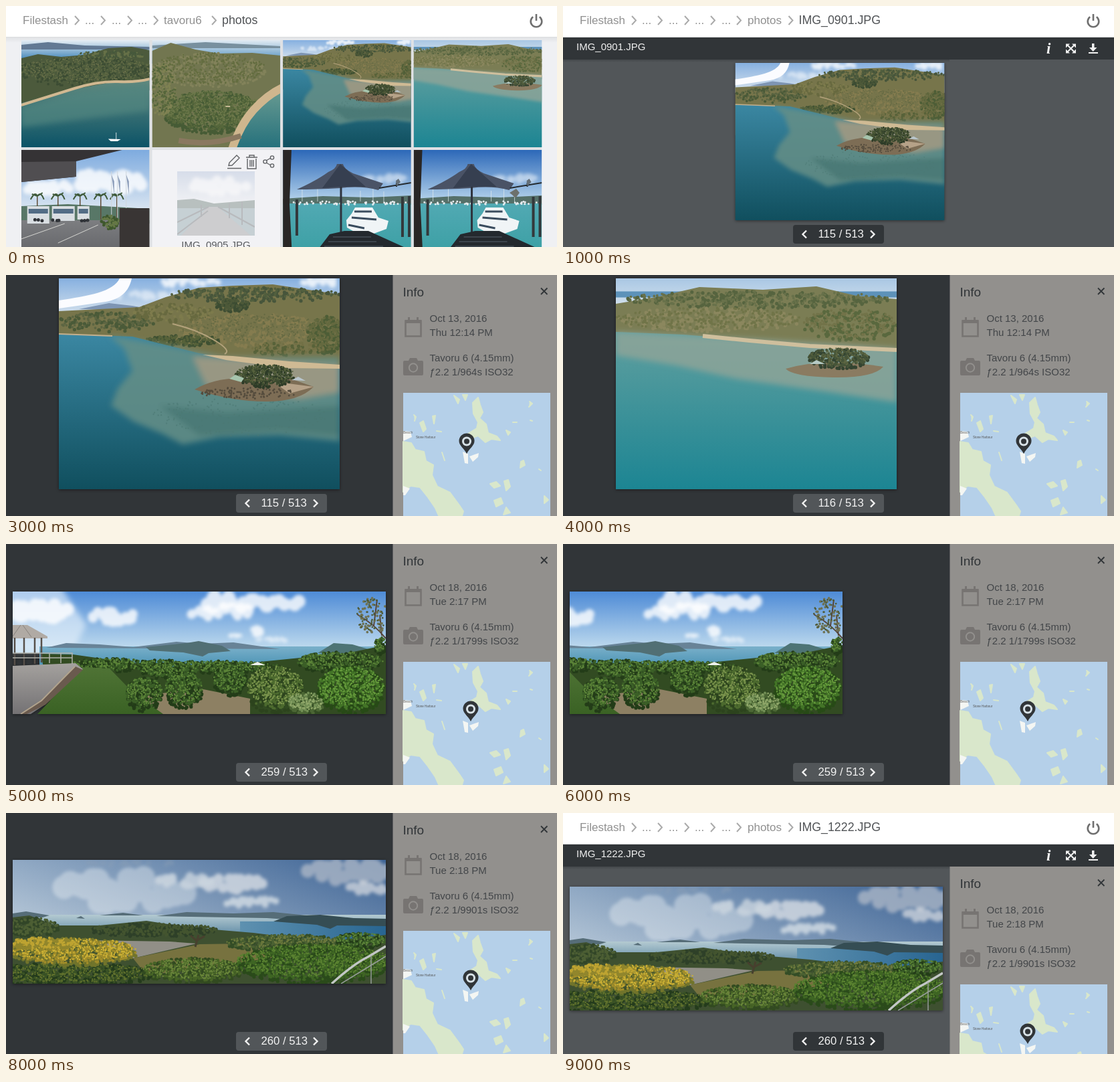
Recreate the animation shown at these times as an HTML page. Size 824 by 360 pixels, loop 10 s.

```html
<!DOCTYPE html>
<html lang="en">
<head>
<meta charset="utf-8">
<title>Photo viewer</title>
<style>
html, body { margin: 0; width: 100%; height: 100%; overflow: hidden; background: #fff; }
svg { display: block; }
text { font: 15px "Liberation Sans", Arial, sans-serif; white-space: pre; }
text.info { font: italic bold 21px "Liberation Serif", serif; }
.photo { filter: drop-shadow(0 1px 2px #0007); }
</style>
</head>
<body>
<svg id="stage" width="824" height="360" viewBox="0 0 824 360">
  <defs id="defs"></defs>
  <g id="view"></g>
</svg>
<script>
const DARK = '#313538', GREY = '#525659', PANEL = '#92908d', ICON = '#777472', TEXT = '#434649';

// ---- drawing helpers ----
let seed = 7, gradients = 0;
const random = () => (seed = seed * 16807 % 2147483647) / 2147483647;
const area = (fill, d, extra = '') => `<path fill="${fill}" d="${d}" ${extra}/>`;
const line = (stroke, width, d, extra = '') =>
  `<path fill="none" stroke="${stroke}" stroke-width="${width}" d="${d}" ${extra}/>`;
const box = (x, y, w, h) => `M${x} ${y}h${w}v${h}h${-w}z`;
const label = (x, y, text, size = 15, fill = TEXT, extra = '') =>
  `<text x="${x}" y="${y}" fill="${fill}" style="font-size:${size}px" ${extra}>${text}</text>`;
const at = (x, y, content) => `<g transform="translate(${x} ${y})">${content}</g>`;
const repeat = (list, draw) => list.map(draw).join('');

// Path filled with an even blend; slanted = 1 runs it left to right.
function wash(d, from, to, slanted = 0) {
  const id = 'wash' + gradients++;
  return `<linearGradient id="${id}" x2="${slanted}" y2="${1 - slanted}">
    <stop stop-color="${from}"/><stop offset="1" stop-color="${to}"/></linearGradient>` + area(`url(#${id})`, d);
}
// Round dots scattered over an ellipse.
function dots(color, size, count, cx, cy, rx, ry, extra = '') {
  let d = '';
  for (let i = 0; i < count; i++) {
    const angle = random() * 2 * Math.PI, r = Math.sqrt(random());
    d += `M${(cx + rx * r * Math.cos(angle)).toFixed(1)} ${(cy + ry * r * Math.sin(angle)).toFixed(1)}h0`;
  }
  return line(color, size, d, 'stroke-linecap="round" ' + extra);
}
// A dense shaded mass with ever smaller and lighter dots towards its top.
const leaves = (cx, cy, rx, ry, colors, size = 3.5, density = 1) => repeat(colors, (color, i) =>
  dots(color, size * (1.5 - i * .4), rx * ry / size / size * 2.4 * density, cx, cy - i * ry * .1, rx, ry * (1 - i * .1)));
const scrub = (cx, cy, rx, ry, colors, size = 3.5) => leaves(cx, cy, rx, ry, colors, size, .45);
const cloud = (cx, cy, rx, ry, color = '#fff', opacity = .8) =>
  dots(color, ry, 26, cx, cy, rx, ry * .6, `opacity="${opacity}" filter="url(#soft)"`);
const soft = content => `<g filter="url(#blur)">${content}</g>`;

// ---- pictures ----
const BUSH = ['#233c18', '#3b5f27', '#5c8438'];

const coveArt = wing =>
  wash(box(0, 0, 420, 60), '#86b0e0', '#dce6ee') +
  cloud(190, 6, 50, 9) + cloud(390, 6, 30, 9) + cloud(130, 25, 60, 8, '#fff', .5) +
  area('#7e95b3', 'M30 46L75 37L110 41L150 48z') + wing +
  area('#77754b', 'M0 49L60 46L120 43L160 28L210 14L260 11L320 9L360 15L420 24V145H0z') +
  scrub(290, 25, 130, 11, ['#47553b', '#525f3e']) + scrub(70, 65, 75, 15, ['#4a5a38', '#5c6542']) +
  scrub(170, 52, 60, 14, ['#67693f', '#7d7b4c']) + scrub(290, 78, 110, 25, ['#857c4f', '#74734a', '#666a43']) +
  leaves(260, 40, 25, 10, ['#3c4c32', '#4c5838']) + leaves(400, 85, 28, 28, ['#4d5d36', '#64693f']) +
  leaves(185, 93, 55, 8, ['#3f5032', '#566139']) + scrub(340, 105, 60, 10, ['#586239', '#727045']) +
  line('#b3a27b', 2, 'M170 68Q205 76 232 92T248 113') +
  wash('M0 83L110 87L170 102L210 112L250 118L340 125L420 130V315H0z', '#3b87a2', '#104f5e') +
  soft(area('#668f86', 'M75 85L170 102L250 118H420V243L330 234L240 237L185 248L155 232L112 214L78 190L88 165L110 138L98 105z', 'opacity=".85"') +
    area('#42736f', 'M150 190L250 200L420 190V235L330 228L210 235z', 'opacity=".65"') +
    area('#a79c83', 'M200 117L270 120L420 130V170L360 180L220 160z', 'opacity=".8"')) +
  area('#cfba94', 'M215 114L260 116L345 124L420 129V135L340 134L250 122z') +
  line('#c4b08e', 2, 'M0 83L80 86') +
  dots('#4c7873', 2.5, 200, 270, 205, 130, 30, 'opacity=".6"') +
  area('#7d6d55', 'M203 166Q230 150 270 149T350 151L381 162Q360 184 310 184T203 166z') +
  area('#b6a288', 'M320 154L381 162L345 172z') + dots('#554c3d', 3, 110, 285, 171, 72, 9) +
  leaves(308, 146, 44, 17, ['#2d3b27', '#3e4c30', '#56613c'], 3) +
  area('#a6c4ad', 'M255 150L264 144L277 149L273 155z') + area('#b9c6cd', 'M348 152L358 147L369 153z');

const pictures = {
  cove: [420, 315, coveArt(area('#fbfcff', 'M0 33C45 26 82 20 91 0H109C105 20 92 31 70 35L0 45z'))],
  inlet: [420, 315, coveArt('')],
  bay: [420, 315,
    wash(box(0, 0, 420, 50), '#a9c7e4', '#dbe6ee') + line('#5d92b9', 9, 'M0 24H420') +
    area('#7b7d54', 'M0 38L60 28L125 13L220 17L300 12L360 26L420 31V115H0z') +
    scrub(210, 32, 200, 13, ['#56643f', '#68714a']) + scrub(140, 62, 140, 18, ['#8b875e', '#707448']) +
    scrub(350, 70, 70, 24, ['#59683e', '#727349']) +
    wash('M0 80L100 84L200 92L290 100L420 105V315H0z', '#5f9f9f', '#1c8593') +
    soft(area('#8ca498', 'M0 80L200 90L420 104V185L320 170L180 150L90 130L0 115z', 'opacity=".85"')) +
    line('#cfbf9d', 6, 'M130 86L200 93L290 101L420 107') +
    area('#8a7b61', 'M254 135Q310 118 400 132Q385 149 325 148T254 135z') +
    leaves(333, 120, 45, 16, ['#344431', '#465539', '#5c6541']) + area('#b6cac4', 'M290 128L300 122L313 128z')],
  shore: [192, 160,
    wash(box(0, 0, 192, 30), '#e6eef5', '#3e83b8') + area('#627994', 'M0 7L40 3L95 8L192 10V14H0z') +
    area('#4c5a3c', 'M0 27L25 21L60 25L95 22L130 12L165 10L192 15V75L0 99z') +
    scrub(96, 47, 105, 22, ['#3c4c33', '#56633f', '#6a704a'], 2.5) + scrub(135, 22, 50, 6, ['#657047', '#45583b'], 2.5) +
    wash('M0 94L80 73L145 61L192 59V160H0z', '#62897e', '#0b5367') +
    soft(area('#528780', 'M0 100L90 76L192 66V105L75 120L0 130z', 'opacity=".7"')) +
    line('#d1b891', 4, 'M0 97Q45 83 80 72T145 62T192 58') +
    area('#fff', 'M130 147.5L149 148L144 151H134z') + line('#fff', .8, 'M142 148V138')],
  headland: [192, 160,
    wash(box(0, 0, 192, 35), '#e1ebf3', '#3f84b8') + area('#78909f', 'M0 8L80 3L192 9V12H0z') +
    area('#727650', 'M0 16L28 4L65 14L100 20L150 19L192 23V160H0z') +
    scrub(85, 45, 85, 26, ['#82825a', '#646d40'], 2.5) + leaves(90, 108, 75, 32, ['#465b35', '#56673b', '#6c784a'], 3) +
    scrub(15, 75, 20, 40, ['#7e8152', '#56663b'], 2.5) +
    wash('M192 72L174 83L150 110L135 137L118 160H192z', '#6a9c92', '#26717c') +
    line('#cfb68e', 12, 'M195 71Q172 82 152 104T120 162') + line('#8a7860', 8, 'M40 150Q85 159 133 143') +
    line('#c6b995', 2, 'M110 99h7')],
  carpark: [192, 160,
    wash(box(0, 0, 192, 110), '#7eabdf', '#eef2f5') + cloud(125, 48, 60, 20) + cloud(45, 58, 38, 14) +
    area('#587767', 'M0 84L70 81L192 88V110H0z') +
    area('#353335', 'M0 0H151L82 17V40L0 48z') + area('#504e51', 'M0 18L82 17V40L0 48z') +
    wash(box(0, 105, 192, 55), '#7d7e81', '#616266') +
    repeat([24, 55, 88, 119, 143], x => line('#614d38', 1.5, `M${x} 104V70`) +
      line('#3f5a3a', 2, `M${x - 10} 74Q${x - 3} 61 ${x} 69Q${x + 5} 61 ${x + 10} 74M${x - 8} 66L${x} 69L${x + 8} 64`)) +
    repeat([[9, 33, 26], [46, 34, 22], [84, 18, 20]], ([x, w, h]) => area('#d9dee2', box(x, 84, w, h)) +
      area('#526c85', box(x + 2, 88, w - 4, 7)) + dots('#303338', 5, 3, x + w / 2, 105, w / 2, 1)) +
    repeat([135, 144, 157], x => line('#cfd6dc', 1, `M${x} 104V32`) + area('#899bb8', `M${x} 37L${x + 4} 47V67z`)) +
    leaves(133, 108, 14, 10, ['#3e572d', '#657845'], 3) + area('#393534', box(147, 87, 45, 73)) +
    line('#d4d4d0', 1, 'M0 133L65 110M55 139L115 112')],
  jetty: [116, 96,
    wash(box(0, 0, 116, 52), '#b7c5dd', '#f4f5f7') + cloud(62, 22, 43, 15) +
    area('#74847f', 'M0 43L25 41L55 48L116 43V57H0z') + area('#92a7ad', box(0, 55, 116, 41)) +
    area('#a2a1a2', 'M46 53H61L110 96H6z') + line('#73787a', 2, 'M0 76L47 53M61 53L116 83M0 94L46 59M36 50V68M78 48V70M97 45V80')],
  marina: [192, 160,
    wash(box(0, 0, 192, 75), '#2c68b8', '#b2d1eb') + cloud(155, 43, 34, 8, '#fff', .5) +
    area('#557069', 'M0 73L60 69L130 71L192 68V82H0z') + wash(box(0, 80, 192, 80), '#51a9b3', '#3a9fa3') +
    dots('#e4ebee', 3, 60, 95, 79, 92, 3) + line('#e2ebee', .7, 'M29 77V58M52 77V56M116 77V61M135 78V56M151 78V62') +
    area('#4a5366', 'M21 59Q50 46 68 33Q80 28 81 21H90Q92 29 105 35L150 50L143 60Q116 53 86 57Q49 59 21 59z') +
    area('#363f50', 'M86 21L59 57L86 55L124 55z') + line('#2e333d', 3, 'M87 55V150') +
    area('#f0f4f6', 'M95 105L103 95L108 86H134L143 101L158 106L155 118L136 125H112L96 116z') +
    line('#3a4c5e', 3, 'M107 92H133M103 101L140 104M98 112L122 117') + area('#24292e', 'M70 126L92 121H128L192 150V160H44z') +
    line('#56616a', 1, 'M75 130H132M68 137H140M62 144H150') +
    area('#292625', 'M0 0H13L10 80L14 160H0z') + line('#33383b', 4, 'M21 74V128M179 70V130M189 69V130') +
    line('#252b30', 2, 'M144 57L192 49M170 55V49') + area('#646f78', 'M170 54L169 46L173 43L176 48z')],
  terrace: [558, 183,
    wash(box(0, 0, 558, 92), '#4e8bd6', '#c8e1f0') + soft(area('#e3f0fa', 'M-20 -10H70L110 50L90 90H-20z', 'opacity=".65"')) +
    cloud(340, 17, 92, 20) + cloud(310, 30, 50, 14) + cloud(150, 37, 36, 15) + cloud(44, 29, 45, 20) +
    cloud(365, 60, 7, 9) + cloud(333, 66, 9, 4) + cloud(390, 72, 25, 5, '#fff', .6) +
    wash(box(40, 82, 518, 38), '#7ab0ca', '#3e8bae') +
    area('#688397', 'M50 84L80 77L130 79L180 83L245 75L282 78L330 76L400 86z') +
    area('#516f74', 'M199 83L260 77L278 74L313 81L326 89L293 92L284 97L255 91L205 88z') +
    area('#4e7475', 'M456 92L480 77L508 79L535 87L528 93z') +
    area('#324b22', 'M42 93L90 94L160 104L240 113L310 104L350 107L440 98L500 92L558 80V183H60z') +
    leaves(150, 110, 62, 10, BUSH) + leaves(300, 113, 100, 9, BUSH) +
    area('#8d8063', 'M175 158L280 145L355 160V183H180z') +
    wash('M104 113L145 115L177 148L225 183H37z', '#4f7335', '#3a6224') +
    wash('M0 111L94 107L105 116L48 169L27 183H0z', '#a4a19e', '#747274') +
    area('#6a5a4e', 'M94 112L105 117L49 169L21 183H11L43 163z') + line('#b1a38d', 2, 'M93 112L43 163L12 183') +
    leaves(490, 106, 64, 16, BUSH) + leaves(225, 116, 36, 14, BUSH) + leaves(197, 154, 27, 26, BUSH) +
    leaves(256, 148, 28, 28, BUSH) + leaves(325, 133, 25, 23, BUSH) +
    leaves(392, 147, 42, 36, ['#2c431d', '#4c6a2e', '#7a934c']) + leaves(440, 167, 28, 16, ['#4b6634', '#728f55', '#92a96b']) +
    leaves(506, 148, 50, 36, ['#274a16', '#437427', '#65993b']) +
    area('#edf1ed', 'M355 110L366 105L378 110z') +
    line('#56463b', 2, 'M558 70Q540 48 515 34M540 51L545 12M552 66L549 35') +
    leaves(537, 37, 24, 28, ['#6e7254', '#4e5a38'], 2.5, .2) + leaves(550, 82, 9, 14, BUSH, 3) +
    area('#b0aaa4', 'M0 50H22L52 67V70H0z') + line('#87827d', 1, 'M12 50L0 67M15 50L28 68') +
    line('#57504a', 2.5, 'M3 69V110M17 69V110M33 69V108M43 69V106') +
    line('#b3b4ad', 1.5, 'M0 92H89V108M0 99H89M55 92V107M72 92V107')],
  garden: [558, 185,
    wash(box(0, 0, 558, 90), '#54779f', '#bccbd6') +
    `<g opacity=".65">${wash(box(0, 0, 558, 88), '#b0c3d7', '#2f578e', 1)}</g>` +
    cloud(160, 45, 110, 35, '#eef3f5', .4) + cloud(330, 36, 47, 16, '#d7dde4') + cloud(260, 31, 42, 12, '#cbd5df') +
    cloud(502, 18, 62, 21, '#aab6c6') + cloud(530, 42, 28, 12, '#ccd3dc') + cloud(355, 63, 40, 10, '#d6dfe6') + cloud(180, 5, 70, 6, '#8b9fb5', .5) +
    wash(box(0, 82, 558, 45), '#b4cad1', '#386d91') + wash(box(340, 92, 218, 33), '#5e91b0', '#286591', 1) +
    area('#566d78', 'M0 80L20 77L55 83L45 86H0zM130 83L165 79L195 83zM215 84L260 78L330 80L390 78L450 84L440 91L380 87zM95 87L102 84L108 88z') +
    area('#354d54', 'M390 92L410 84L460 82L510 87L558 88V99L485 98L475 103L455 97z') +
    area('#3e5030', 'M0 86L25 83L65 98L130 98L200 91L245 98L300 104L360 109L400 114L470 122L558 112V185H0z') +
    leaves(30, 101, 40, 14, ['#314527', '#4c5e33']) + leaves(210, 105, 95, 10, ['#2e4028', '#43542f']) +
    area('#918f87', 'M110 120L235 122L275 125L180 147z') + area('#77723f', 'M180 147L280 126L350 125L395 145L320 158L200 172z') +
    line('#47402e', 3, 'M273 130L278 112M275 121L266 113M276 120L287 114') +
    leaves(410, 125, 90, 13, ['#344d26', '#4b6132', '#6e7a3d']) + leaves(520, 121, 38, 12, BUSH) +
    leaves(80, 172, 130, 18, ['#243b1c', '#3a5225', '#5f702c']) +
    leaves(90, 138, 98, 21, ['#71742b', '#a08c2a', '#cdb235']) + leaves(45, 125, 50, 9, ['#91862c', '#bda331']) +
    leaves(270, 166, 75, 19, ['#324a20', '#476426', '#69853a']) +
    leaves(450, 156, 115, 30, ['#2a4a1a', '#3e6523', '#5a8230']) +
    line('#c3c7c6', 3.5, 'M477 185Q510 155 533 144L558 129') + line('#969c9a', 1.5, 'M491 185L558 144M536 143V185')]
};

// ---- map (220 x 190) ----
const map = area('#b5d0e9', box(0, 0, 220, 190)) +
  area('#d9e7cb', `M0 73L12 75L18 85L31 88L34 102L45 108L43 123L51 140L70 149L84 168L90 177L86 190H56L48 172L37 156L25 141L11 139L0 148z
    M104 15L112 7L115 18L119 29L114 38L124 47L127 60L140 65L145 71L132 69L123 74L112 64L101 68L97 61L110 53L112 44L105 31z
    M76 4L84 10L82 16zM89 3L96 3L93 11zM25 45L30 42L34 54L30 58zM44 35L48 34L46 46zM50 57L57 58M16 33L19 36L17 42
    M154 56L160 59L157 63zM189 13L193 16L188 21M164 44L170 44M176 103L180 101L182 108L175 112z
    M130 136L139 133L145 139L136 142zM151 132L157 130L160 140L154 146zM136 161L146 157L149 165L139 170zM154 171L160 179L150 182z
    M203 114L206 116M211 154L217 160L211 165zM58 89L62 101M190 41L193 42`,
    'stroke="#d9e7cb" stroke-width="2" stroke-linejoin="round" stroke-linecap="round"') +
  area('#f4f6f3', 'M0 57L11 58L13 66L0 72zM0 139L10 143L3 153H0zM89 88L97 91L97 106L92 105zM99 95L107 92L113 90L112 96L104 103z') +
  label(0, 61, 'Beach', 5, '#666') + label(19, 68, 'Stone Harbour', 4.5, '#555');
const pin = area(DARK, 'M0 0C-3 -7-11.5 -12-11.5 -19a11.5 11.5 0 0 1 23 0C11.5 -12 3 -7 0 0z') +
  `<circle cy="-18.5" r="7" fill="#d8e2e7"/><circle cy="-18.5" r="4" fill="${DARK}"/>`;

// Blur regions span a whole picture so that soft shapes keep their edges.
const blurFilter = (id, amount) => `<filter id="${id}" filterUnits="userSpaceOnUse" x="-30" y="-30" width="620" height="375">
  <feGaussianBlur stdDeviation="${amount}"/></filter>`;
document.getElementById('defs').innerHTML = blurFilter('soft', 2.5) + blurFilter('blur', 4) +
  repeat(Object.entries(pictures), ([name, [w, h, art]]) =>
    `<symbol id="${name}" viewBox="0 0 ${w} ${h}" preserveAspectRatio="xMidYMid slice">${art}</symbol>`);

const picture = (name, x, y, w, h, extra = '') =>
  `<use href="#${name}" x="${x}" y="${y}" width="${w}" height="${h}" ${extra}/>`;

// ---- interface parts ----
function header(trail, current, currentX) {
  const chevron = x => line('#aaa', 2, `M${x - 3} 15l6 6.5l-6 6.5`);
  return area('#fff', box(0, 0, 824, 46)) + area('#dcdddf', box(0, 46, 824, 1)) +
    repeat(trail, ([x, text]) => label(x, 27, text, 17, '#909090')) +
    repeat([106, 145, 185, 224, ...(trail.length > 5 ? [263] : []), currentX - 12], chevron) +
    label(currentX, 27, current, 17.8, '#505356') +
    line('#6f6f6f', 2.6, 'M788.2 16.2A8.3 8.3 0 1 0 797.8 16.2M793 12V22');
}
const dotsAt = xs => xs.map(x => [x, '...']);

function gridView() {
  const tiles = ['shore', 'headland', 'inlet', 'bay', 'carpark', null, 'marina', 'marina'];
  const tileIcons = line('#606265', 1.4, `M331 242.5H352M333 238.5L334 234L345 223L349 227L338 238z
    M359 226H376M364 226V223H371V226M361 228V243H374V228M365 230V240M367.5 230V240M370 230V240
    M389 231L396 227M389 234L396 238`) + repeat([[387.5, 232.5], [398, 226.5], [398, 238.5]],
    ([x, y]) => `<circle cx="${x}" cy="${y}" r="2.6" fill="none" stroke="#606265" stroke-width="1.4"/>`);
  return area('#eff0f3', box(0, 0, 824, 360)) + wash(box(0, 46, 824, 9), '#dfe1e4', '#eff0f3') +
    area('#dfe1e4', box(23, 51, 778, 309)) +
    repeat(tiles, (name, i) => name
      ? picture(name, 23 + i % 4 * 195.6, i < 4 ? 51 : 215, 191.5, 160)
      : area('#f2f2f5', box(218.5, 215, 191.5, 145))) +
    area('#6d716c', 'M753 279L763 273L768 279L762 287L757 282z') +
    tileIcons + picture('jetty', 256, 247, 116, 96, 'opacity=".45"') +
    label(314, 362, 'IMG_0905.JPG', 15, '#5b5d60', 'text-anchor="middle"') +
    header([[25, 'Filestash'], ...dotsAt([118, 158, 197]), [236, 'tavoru6']], 'photos', 323);
}

function toolbar(file) {
  return area(DARK, box(0, 47, 824, 33)) + wash(box(0, 80, 578, 4), '#44484b', GREY) + label(20, 66, file, 15, '#f0f0f0') +
    label(723, 71, 'i', 23, '#f2f2f2', 'class="info"') +
    line('#f2f2f2', 2, 'M754 58L765 69M765 58L754 69') +
    area('#f2f2f2', 'M752 56.5h6l-6 6zM767 56.5h-6l6 6zM752 70.5h6l-6-6zM767 70.5h-6l6-6z') +
    area('#f2f2f2', 'M791 56h3.5v6h4l-5.8 6l-5.7-6h4zM786 69h14v2h-14z');
}

function infoPanel({ date, time, exposure, pinAt }) {
  return area(PANEL, box(578.5, 80, 246, 360)) + label(593.5, 112, 'Info', 19, DARK) +
    line(DARK, 1.8, 'M800 99.5L809.5 109M809.5 99.5L800 109') +
    line(ICON, 2.6, 'M597.5 148.5H620.5V171.5H597.5z') + area(ICON, box(597, 147, 24, 5) + box(601, 143, 3, 7) + box(614, 143, 3, 7)) +
    area(ICON, 'M596 208H602L604 204H614L616 208H622Q624 208 624 210V228Q624 230 622 230H596Q594 230 594 228V210Q594 208 596 208z') +
    `<circle cx="609" cy="218.5" r="6.2" fill="${ICON}" stroke="${PANEL}" stroke-width="2"/>` +
    label(633.5, 150, date) + label(633.5, 171, time) +
    label(633.5, 209, 'Tavoru 6 (4.15mm)') + label(633.5, 230, `ƒ2.2 ${exposure} ISO32`) +
    at(594, 256, map) + at(pinAt[0], pinAt[1], pin);
}

function photoView({ photo, file, index, info, full, swipe = 0 }) {
  const [width, height] = pictures[photo];
  const middle = info ? 289 : 414, top = full ? 5 : 85, bottom = 320;
  const scale = Math.min(558 / width, (bottom - top) / height);
  const w = width * scale, h = height * scale;
  const frame = `<svg x="${middle - w / 2}" y="${(top + bottom - h) / 2}" width="${w}" height="${h}" class="photo">
    ${picture(photo, -swipe, 0, w, h)}</svg>`;
  return area(full ? DARK : GREY, box(0, 0, 824, 360)) + frame +
    (info ? at(0, full ? -80 : 0, infoPanel(info)) : '') +
    (full ? '' : toolbar(file) + header([[25, 'Filestash'], ...dotsAt([118, 158, 197, 237]), [276, 'photos']], file, 352.5)) +
    `<rect x="344" y="327" width="136" height="28" rx="4" fill="${full ? GREY : DARK}"/>` +
    line('#f2f2f2', 2.4, 'M364 335.5L358.5 341L364 346.5M460 335.5L465.5 341L460 346.5') +
    label(381.5, 346, `${index} / 513`, 16.7, '#f2f2f2');
}

// ---- timeline: one scene per second ----
const flight = { date: 'Oct 13, 2016', time: 'Thu 12:14 PM', exposure: '1/964s', pinAt: [689, 347] };
const lookout = { date: 'Oct 18, 2016', time: 'Tue 2:17 PM', exposure: '1/1799s', pinAt: [695, 345] };
const hillside = { ...lookout, time: 'Tue 2:18 PM', exposure: '1/9901s' };
const cove = { photo: 'cove', file: 'IMG_0901.JPG', index: 115 };
const terrace = { photo: 'terrace', index: 259, info: lookout, full: true };
const garden = { photo: 'garden', file: 'IMG_1222.JPG', index: 260, info: hillside };
const scenes = [
  gridView(),
  ...[
    cove,
    { ...cove, info: flight },
    { ...cove, info: flight, full: true },
    { photo: 'bay', index: 116, info: flight, full: true },
    terrace,
    { ...terrace, swipe: 150 },
    { ...terrace, swipe: 300 },
    { ...garden, full: true },
    garden
  ].map(photoView)
];

const view = document.getElementById('view');
let shown = -1;
function tick() {
  const scene = Math.floor(performance.now() / 1000) % scenes.length;
  if (scene !== shown) view.innerHTML = scenes[shown = scene];
  requestAnimationFrame(tick);
}
tick();
</script>
</body>
</html>
```
